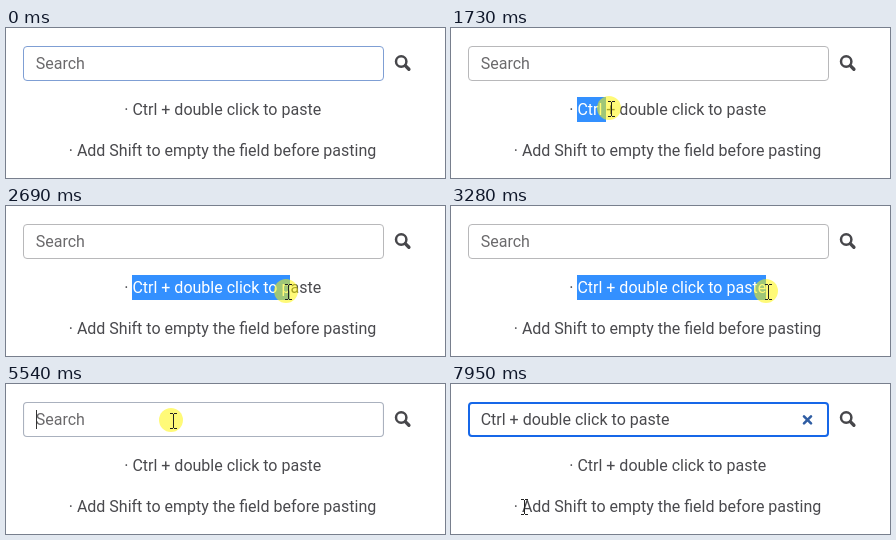
These frames come from a looping animation (439x150 px, 8000 ms). An HTML page:

```html
<!DOCTYPE html>
<html lang="en">
<head>
<meta charset="utf-8">
<title>Paste with a double click</title>
<style>
  html, body { margin: 0; width: 100%; height: 100%; overflow: hidden; background: #fff; }
  svg { display: block; width: 439px; height: 150px; }
  text { font: 16px Roboto, Arial, sans-serif; fill: #4a4a4e; white-space: pre; }
  .crisp { shape-rendering: crispEdges; }
</style>
</head>
<body>
<svg viewBox="0 0 439 150">
  <defs>
    <clipPath id="selClip"><rect id="selBox" x="126" y="69" width="0" height="25"/></clipPath>
  </defs>

  <rect id="field" fill="#fff"/>
  <text id="hint" x="29.7" y="41" style="fill:#6b6a6c">Search</text>
  <text id="value" x="29.7" y="41">Ctrl + double click to paste</text>
  <rect id="caret" class="crisp" y="26" width="1" height="19" fill="#333"/>
  <path id="clear" d="M353 32.4l7 7m0-7l-7 7" stroke="#2f5da3" stroke-width="2.6" stroke-linecap="round"/>
  <g fill="none" stroke="#47474b">
    <circle cx="395.2" cy="33.5" r="5.2" stroke-width="2.5"/>
    <path d="M399.3 37.6l3.6 3.6" stroke-width="3.4" stroke-linecap="round"/>
  </g>

  <text x="122.4" y="87" text-anchor="end">·</text>
  <text id="line" x="126.4" y="87">Ctrl + double click to paste</text>
  <rect id="selFill" class="crisp" x="126" y="69" width="0" height="25" fill="#3390ff"/>
  <text x="126.4" y="87" style="fill:#fff" clip-path="url(#selClip)">Ctrl + double click to paste</text>
  <text x="216.5" y="128" text-anchor="middle">· Add Shift to empty the field before pasting</text>

  <circle id="halo" r="12" fill="#fff500" fill-opacity=".53"/>
  <path id="beam" class="crisp" fill="#222" d="M0 0h3v1h1v-1h3v1h-3v14h3v1h-3v-1h-1v1h-3v-1h3v-14h-3z"/>
  <path id="arrow" d="M.5.5v15.8l3.6-3.5 2.5 5.6 2.3-1-2.4-5.5h5z" fill="#fff" stroke="#000"/>
</svg>
<script>
const LOOP = 8000, ENTER = 310, PRESS = 1410, DRAG = 1610, DROP = 3380, RELEASE = 3550;
const CLICK = 5540, PASTE = 5700, BLINK = 360, TEXT_X = 126;
const $ = id => document.getElementById(id);
const set = (id, attrs) => {
  for (const k in attrs) $(id).setAttribute(k, attrs[k]);
};
const show = (id, on) => { $(id).style.display = on ? '' : 'none'; };
const within = (v, a, b) => v >= a && v < b;
const clamp = v => Math.min(1, Math.max(0, v));
const mix = (a, b, p) => a + (b - a) * p;
const ease = p => p ** 0.73;

// Each move starts where the previous one ended; bow bends it sideways.
const entry = { x: 182, y: 156 };
const moves = [
  { from: ENTER, to: 620, x: 129, y: 79, bow: -26 },
  { from: DRAG, to: 2390, x: 241, y: 84 },
  { from: 2420, to: 3020, x: 310, y: 85 },
  { from: 3250, to: 3280, x: 315, y: 85 },
  { from: 3880, to: 4250, x: 163, y: 35 },
  { from: 4650, to: 5280, x: 165, y: 36 },
  { from: 6836, to: 7620, x: 66, y: 124 },
  { from: 7790, to: 7950, x: 71, y: 122 }
];

function pointerAt(t) {
  let { x, y } = entry;
  for (const m of moves) {
    const p = ease(clamp((t - m.from) / (m.to - m.from)));
    x = mix(x, m.x, p) + (m.bow || 0) * Math.sin(Math.PI * p);
    y = mix(y, m.y, p);
  }
  return [Math.round(x), Math.round(y)];
}

// Selection ends at the character boundary nearest to the pointer.
function selectionWidth(x) {
  const line = $('line'), n = line.getNumberOfChars();
  let end = TEXT_X;
  for (let i = 0; i < n; i++) {
    const from = line.getStartPositionOfChar(i).x, to = line.getEndPositionOfChar(i).x;
    if (x < (from + to) / 2) break;
    end = to;
  }
  return Math.round(end - TEXT_X);
}

function drawField(t) {
  const p = clamp((t - 5520) / 250);
  const w = 1 + p;
  const grey = [184, 184, 186], blue = [22, 103, 232];
  const color = t < 30 ? '#7f9fd4' : `rgb(${grey.map((c, i) => Math.round(mix(c, blue[i], p)))})`;
  set('field', {
    x: 17 + w / 2, y: 18 + w / 2, width: 361 - w, height: 35 - w,
    rx: 4 - w / 2, stroke: color, 'stroke-width': w
  });
  const pasted = t >= PASTE;
  show('hint', !pasted);
  show('value', pasted);
  show('clear', pasted);
  set('caret', { x: pasted ? 218 : 30 });
  const lit = Math.floor((t - CLICK + 110) / BLINK) % 2 === 0 || t < 6150;
  show('caret', t >= CLICK && lit);
}

function drawPointer(t) {
  const [x, y] = pointerAt(t);
  const width = within(t, DRAG, CLICK) ? selectionWidth(t < DROP ? x : Infinity) : 0;
  set('selFill', { width });
  set('selBox', { width });

  const overText = within(y, 18, 53) || within(y, 70, 94) || within(y, 111, 135);
  const overSelection = within(t, DROP, CLICK) && within(y, 70, 94);
  const beam = overText && !overSelection;
  show('beam', t >= ENTER && beam);
  show('arrow', t >= ENTER && !beam);
  set('beam', { transform: `translate(${x - 1} ${y - 7})` });
  set('arrow', { transform: `translate(${x} ${y})` });

  show('halo', within(t, PRESS, RELEASE) || within(t, CLICK, PASTE));
  set('halo', { cx: x, cy: y });
}

function draw(t) {
  drawField(t);
  drawPointer(t);
}

const start = performance.now();
function tick() {
  draw((performance.now() - start) % LOOP);
  requestAnimationFrame(tick);
}
draw(0);
requestAnimationFrame(tick);
</script>
</body>
</html>
```
